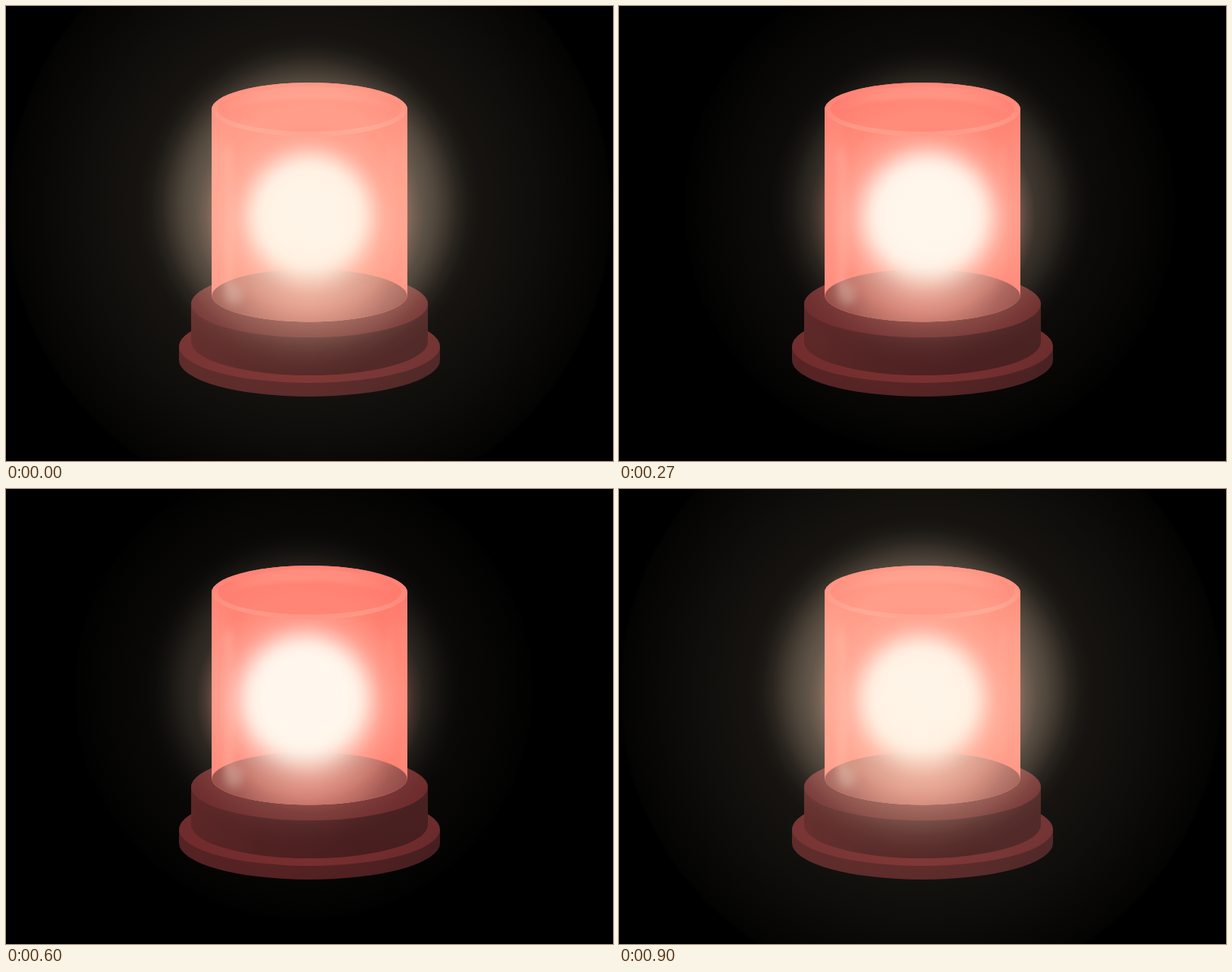
Write an HTML page with a canvas that moves like this. It is 800 px wide and 600 px high and loops after 0.93 s.

```html
<!DOCTYPE html>
<html lang="en">
<head>
<meta charset="utf-8">
<title>Beacon</title>
<style>
html, body { margin: 0; width: 100%; height: 100%; overflow: hidden; background: #000; }
canvas { display: block; }
</style>
</head>
<body>
<canvas id="stage" width="800" height="600"></canvas>
<script>
const ctx = document.getElementById('stage').getContext('2d');
const LOOP = 930, STEP = 30, CX = 400, TAU = Math.PI * 2;

function addStops(g, stops) {
  for (const [at, color] of stops) g.addColorStop(at, color);
  return g;
}
const across = (c, x0, x1, stops) => addStops(c.createLinearGradient(x0, 0, x1, 0), stops);
const down = (c, y0, y1, stops) => addStops(c.createLinearGradient(0, y0, 0, y1), stops);

function ellipse(c, y, rx, ry, fill) {
  c.beginPath();
  c.ellipse(CX, y, rx, ry, 0, 0, TAU);
  c.fillStyle = fill;
  c.fill();
}

function wallPath(c, y0, y1, rx, ry) {
  c.beginPath();
  c.ellipse(CX, y0, rx, ry, 0, Math.PI, TAU);
  c.ellipse(CX, y1, rx, ry, 0, 0, Math.PI);
  c.closePath();
}

// Radial light; stops are [radius, alpha] pairs.
function glow(c, x, y, r, rgb, stops, strength = 1) {
  const g = c.createRadialGradient(x, y, 0, x, y, r);
  const last = stops[stops.length - 1][0];
  for (const [d, a] of stops) g.addColorStop(d / last, `rgba(${rgb},${a * strength})`);
  c.fillStyle = g;
  c.fillRect(x - r, y - r, 2 * r, 2 * r);
}

function tier(c, y0, y1, rx, ry, side, top) {
  wallPath(c, y0, y1, rx, ry);
  c.fillStyle = across(c, CX - rx, CX + rx, side);
  c.fill();
  ellipse(c, y0, rx, ry, across(c, CX - rx, CX + rx, top));
}

function shine(c, x, y, w, h, stops, blur) {
  c.save();
  c.filter = `blur(${blur}px)`;
  c.fillStyle = down(c, y, y + h, stops);
  c.beginPath();
  c.ellipse(x + w / 2, y + h / 2, w / 2, h / 2, 0, 0, TAU);
  c.rect(x, y + 12, w * 0.7, h - 24);
  c.fill();
  c.restore();
}

function drawLamp(c) {
  tier(c, 449, 467, 172, 48,
    [[0, '#521e20'], [0.5, '#501c1e'], [1, '#431b1d']],
    [[0, '#6c2628'], [0.5, '#74282a'], [1, '#672628']]);
  tier(c, 393, 443, 156, 44,
    [[0, '#572022'], [0.3, '#4a1a1c'], [0.7, '#421719'], [1, '#421a1c']],
    [[0, '#672527'], [0.5, '#6c282a'], [1, '#682527']]);

  c.save();
  wallPath(c, 136.5, 381, 129, 35.5);
  c.clip();
  c.fillStyle = across(c, 271, 529, [
    [0, '#ff8276'], [0.06, '#ff7d71'], [0.12, '#ff7367'],
    [0.5, '#ff7568'], [0.88, '#ff6c60'], [0.95, '#ff7266'], [1, '#ff7c70']]);
  c.fillRect(270, 98, 260, 322);
  c.fillStyle = down(c, 170, 380, [[0, 'rgba(255,90,82,.22)'], [0.3, 'rgba(255,120,108,0)'], [1, 'rgba(255,130,118,.25)']]);
  c.fillRect(270, 98, 260, 322);

  const floor = addStops(c.createRadialGradient(CX, 352, 20, CX, 352, 135), [
    [0, '#d87e74'], [0.45, '#b25f59'], [0.75, '#964745'], [1, '#8a3f3e']]);
  ellipse(c, 383, 129, 36, floor);
  shine(c, 288, 184, 13, 196, [[0, 'rgba(255,190,180,.5)'], [0.25, 'rgba(255,170,160,.25)'], [1, 'rgba(255,190,180,.38)']], 5);
  shine(c, 502, 182, 9, 185, [[0, 'rgba(255,170,160,.3)'], [0.35, 'rgba(255,160,150,.05)'], [1, 'rgba(255,170,160,.1)']], 4);
  shine(c, 288, 363, 24, 31, [[0, 'rgba(210,175,165,.45)'], [1, 'rgba(210,175,165,.5)']], 6);
  c.restore();
}

function drawCap(c) {
  ellipse(c, 136.5, 129, 35.5, down(c, 101, 172, [[0, '#ff746a'], [0.5, '#ff8074'], [1, '#ff8579']]));
  c.save();
  c.beginPath();
  c.ellipse(CX, 136, 121, 29.5, 0, 0, TAU);
  c.clip();
  c.fillStyle = across(c, 279, 521, [[0, '#ff7166'], [0.3, '#ff7e73'], [0.7, '#ff7e73'], [1, '#ff7166']]);
  c.fillRect(270, 100, 260, 72);
  c.filter = 'blur(2px)';
  ellipse(c, 152, 119, 30, '#ff6d62');
  c.restore();
}

function layer(draw) {
  const el = document.createElement('canvas');
  el.width = 800;
  el.height = 600;
  draw(el.getContext('2d'));
  return el;
}

const CORE = [[0, 0.96], [45, 0.94], [60, 0.85], [70, 0.68], [80, 0.46], [90, 0.27], [100, 0.14], [110, 0.075], [120, 0.04], [135, 0]];
const HALO = [[0, 0.18], [60, 0.2], [110, 0.36], [130, 0.37], [150, 0.31], [165, 0.25], [180, 0.17], [195, 0.08], [210, 0.025], [225, 0]];
const HAZE = [[0, 0.1], [200, 0.095], [250, 0.08], [300, 0.06], [350, 0.036], [395, 0.014], [400, 0]];
const EMBER = [[0, 0.12], [110, 0.14], [128, 0.18], [140, 0.07], [152, 0]];

const lamp = layer(drawLamp), cap = layer(drawCap);

function render(ms) {
  const angle = TAU * (Math.floor((ms % LOOP) / STEP) * STEP) / LOOP;
  const side = Math.sin(angle), front = Math.cos(angle);

  ctx.fillStyle = '#000';
  ctx.fillRect(0, 0, 800, 600);
  ctx.drawImage(lamp, 0, 0);
  glow(ctx, CX, 278, 150, '255,110,95', EMBER);
  glow(ctx, CX, 278, 135, '255,252,246', CORE);
  glow(ctx, CX + 14 * side, 277, 135 - 5 * front, '255,252,246', CORE);
  ctx.drawImage(cap, 0, 0);
  glow(ctx, CX + 10 * side, 266, 340 + 60 * front, '255,225,185', HAZE, 0.72 + 0.28 * front);
  glow(ctx, CX + 11 * side, 263, 215 + 10 * front, '255,222,192', HALO, 0.67 + 0.33 * front);
}

const start = performance.now();
function tick() {
  render(performance.now() - start);
  requestAnimationFrame(tick);
}
tick();
</script>
</body>
</html>
```
